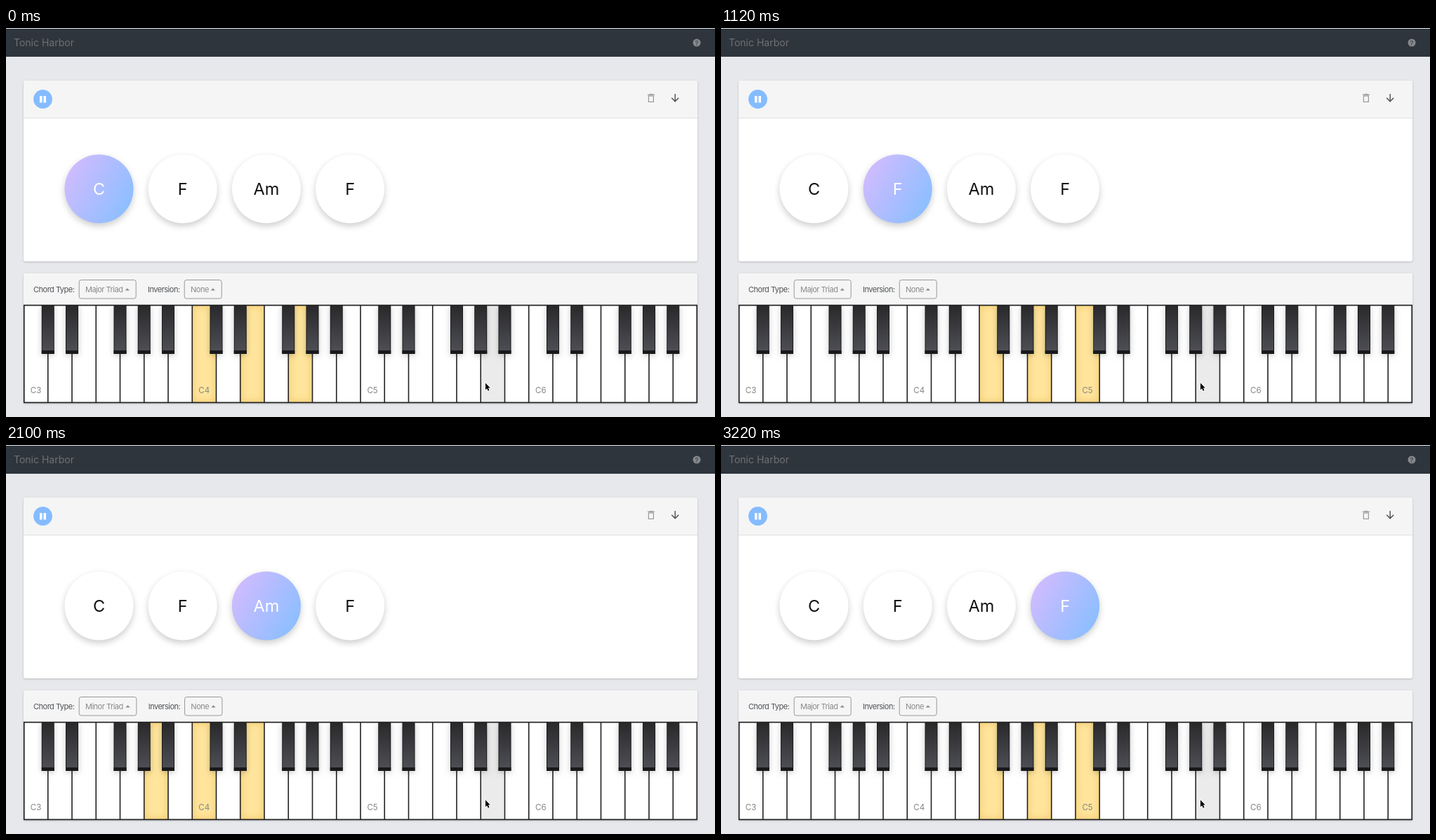
Write an HTML page with a canvas that moves like this. It is 1010 px wide and 555 px high and loops after 3.36 s.

```html
<!DOCTYPE html>
<html lang="en">
<head>
<meta charset="utf-8">
<title>Chord progression player</title>
<style>
html, body { margin: 0; width: 100%; height: 100%; overflow: hidden; background: #e7e8ec; }
canvas { display: block; width: 1010px; height: 555px; }
</style>
</head>
<body>
<canvas id="stage" width="1010" height="555"></canvas>
<script>
const canvas = document.getElementById('stage');
const ctx = canvas.getContext('2d');
const FONT = 'Inter, "Open Sans", sans-serif';
const LOOP = 3360;
const CHORDS = ['C', 'F', 'Am', 'F'];
const STEPS = [
  { start: 0, keys: [7, 9, 11], type: 'Major Triad', shift: 0 },
  { start: 700, keys: [10, 12, 14], type: 'Major Triad', shift: 0 },
  { start: 1680, keys: [5, 7, 9], type: 'Minor Triad', shift: 0.7 },
  { start: 2660, keys: [10, 12, 14], type: 'Major Triad', shift: 0 }
];
const PIANO = { x: 25.75, y: 395.5, h: 139, keys: 28, pitch: 34.25 };
const HOVERED = 19;

function rect(x, y, w, h, fill) {
  ctx.fillStyle = fill;
  ctx.fillRect(x, y, w, h);
}

function text(str, x, y, size, color, { align = 'left', spacing = 0 } = {}) {
  ctx.font = `${size}px ${FONT}`;
  ctx.textAlign = align;
  ctx.letterSpacing = spacing + 'px';
  ctx.fillStyle = color;
  ctx.fillText(str, x, y);
}

function path(points, closed) {
  ctx.beginPath();
  points.forEach(([x, y]) => ctx.lineTo(x, y));
  if (closed) ctx.closePath();
}

function circle(x, y, r, fill) {
  ctx.beginPath();
  ctx.arc(x, y, r, 0, Math.PI * 2);
  ctx.fillStyle = fill;
  ctx.fill();
}

function withShadow(color, blur, dy, draw) {
  ctx.save();
  ctx.shadowColor = color;
  ctx.shadowBlur = blur;
  ctx.shadowOffsetY = dy;
  draw();
  ctx.restore();
}

function card(y, h, headerHeight) {
  withShadow('rgba(0,0,0,.2)', 3, 1, () => {
    ctx.beginPath();
    ctx.roundRect(25, y, 960, h, 3);
    ctx.fillStyle = '#fff';
    ctx.fill();
  });
  ctx.beginPath();
  ctx.roundRect(25, y, 960, headerHeight, [3, 3, 0, 0]);
  ctx.fillStyle = '#f5f5f5';
  ctx.fill();
}

function drawNavbar() {
  rect(0, 0, 1010, 555, '#e7e8ec');
  rect(0, 1, 1010, 40, '#2f353d');
  text('Tonic Harbor', 11, 26, 14, '#6f7072');
  circle(984, 21, 5.5, '#85888c');
  text('?', 984, 24.5, 9.5, '#2f353d', { align: 'center' });
}

function drawToolbar() {
  card(75, 258, 53);
  rect(25, 128, 960, 1, '#e0e0e0');
  circle(52.5, 101.5, 13.4, '#85bcff');
  rect(48, 97, 3.5, 9.5, '#fff');
  rect(53.5, 97, 3.5, 9.5, '#fff');

  ctx.strokeStyle = '#999';
  ctx.lineWidth = 1.2;
  ctx.strokeRect(915.4, 97, 7, 8.4);
  rect(914, 94.6, 10, 1.3, '#999');
  rect(916.8, 93.8, 4.4, 1, '#999');

  ctx.strokeStyle = '#4c4c4c';
  ctx.lineWidth = 1.4;
  path([[953.2, 94], [953.2, 104.8]]);
  ctx.stroke();
  path([[948.2, 99.8], [953.2, 104.8], [958.2, 99.8]]);
  ctx.stroke();
}

function drawChord(name, index, active) {
  const x = 132.5 + index * 119.2, y = 229.5, r = 49;
  let fill = '#fff';
  if (active) {
    fill = ctx.createLinearGradient(x - 52, y - 30, x + 52, y + 30);
    fill.addColorStop(0, '#d5bbff');
    fill.addColorStop(1, '#86bfff');
  }
  withShadow('rgba(0,0,0,.2)', 10, 4, () => circle(x, y, r, fill));
  text(name, x, y + 8.8, 23.5, active ? '#fff' : '#111', { align: 'center' });
}

function dropdown(label, x, width) {
  ctx.beginPath();
  ctx.roundRect(x + 0.2, 359.5, width, 26.5, 3);
  ctx.strokeStyle = '#999';
  ctx.lineWidth = 1;
  ctx.stroke();
  text(label, x + 9, 377, 11, '#8a8a8a', { spacing: -0.5 });
  const tip = x + width - 12.2;
  path([[tip - 3.2, 374.4], [tip, 371.2], [tip + 3.2, 374.4]], true);
  ctx.fillStyle = '#8a8a8a';
  ctx.fill();
}

function drawControls({ type, shift }) {
  card(350, 185, 45);
  text('Chord Type:', 39, 377, 11, '#505357', { spacing: -0.5 });
  dropdown(type, 104, 81 + shift);
  text('Inversion:', 202 + shift, 377, 11, '#505357', { spacing: -0.5 });
  dropdown('None', 254 + shift / 2, 53 + shift / 2);
}

function drawPressedKey(x) {
  const { y, h, pitch } = PIANO;
  ctx.save();
  ctx.beginPath();
  ctx.rect(x, y, pitch, h);
  ctx.clip();
  rect(x, y, pitch, h, '#ffe59c');
  // A stroke just outside the clip casts the inner glow.
  withShadow('rgba(225,165,50,.75)', 11, 0, () => {
    ctx.strokeStyle = '#e5b450';
    ctx.lineWidth = 4;
    ctx.strokeRect(x - 2, y - 2, pitch + 4, h + 4);
  });
  ctx.restore();
}

function drawBlackKey(center) {
  const x = center - 9, y = 396, h = 69;
  withShadow('rgba(0,0,0,.22)', 9, 2, () => rect(x, y, 18, h, '#1b1b1e'));
  const fill = ctx.createLinearGradient(0, y, 0, y + 64);
  fill.addColorStop(0, '#29292b');
  fill.addColorStop(1, '#4d4e54');
  rect(x + 1, y, 16, 64, fill);
  rect(x, y + 64, 18, 5, '#19191c');
}

function drawPiano(pressed) {
  const { x, y, h, keys, pitch } = PIANO;
  const keyX = i => x - 0.25 + i * pitch;
  rect(x, y, keys * pitch, h, '#fff');
  rect(keyX(HOVERED), y, pitch, h, '#ebebeb');
  pressed.forEach(i => drawPressedKey(keyX(i)));

  ctx.save();
  ctx.beginPath();
  ctx.rect(25, 395, 960, 140);
  ctx.clip();
  for (let i = 1; i < keys; i++) rect(keyX(i) - 0.8, y, 1.6, h, '#222');
  for (let i = 1; i < keys; i++) {
    if ([1, 2, 4, 5, 6].includes(i % 7)) drawBlackKey(keyX(i));
  }
  ctx.restore();

  ctx.strokeStyle = '#222';
  ctx.lineWidth = 1.7;
  ctx.strokeRect(x, 395.6, keys * pitch - 0.5, 138.8);
  for (let octave = 0; octave < 4; octave++) {
    text('C' + (octave + 3), keyX(octave * 7) + 17, 521, 11.5, '#858585', { align: 'center' });
  }
}

function drawCursor() {
  path([[683, 506.5], [683, 516.2], [685.2, 514.2], [686.8, 517.8],
    [688.5, 517], [686.9, 513.6], [689.8, 513.4]], true);
  ctx.strokeStyle = '#fff';
  ctx.lineWidth = 1.4;
  ctx.stroke();
  ctx.fillStyle = '#000';
  ctx.fill();
}

function render(now) {
  const time = now % LOOP;
  const active = STEPS.findLastIndex(step => time >= step.start);
  const step = STEPS[active];
  drawNavbar();
  drawToolbar();
  CHORDS.forEach((name, i) => drawChord(name, i, i === active));
  drawControls(step);
  drawPiano(step.keys);
  drawCursor();
}

const began = performance.now();
function tick() {
  render(performance.now() - began);
  requestAnimationFrame(tick);
}
tick();
</script>
</body>
</html>
```
